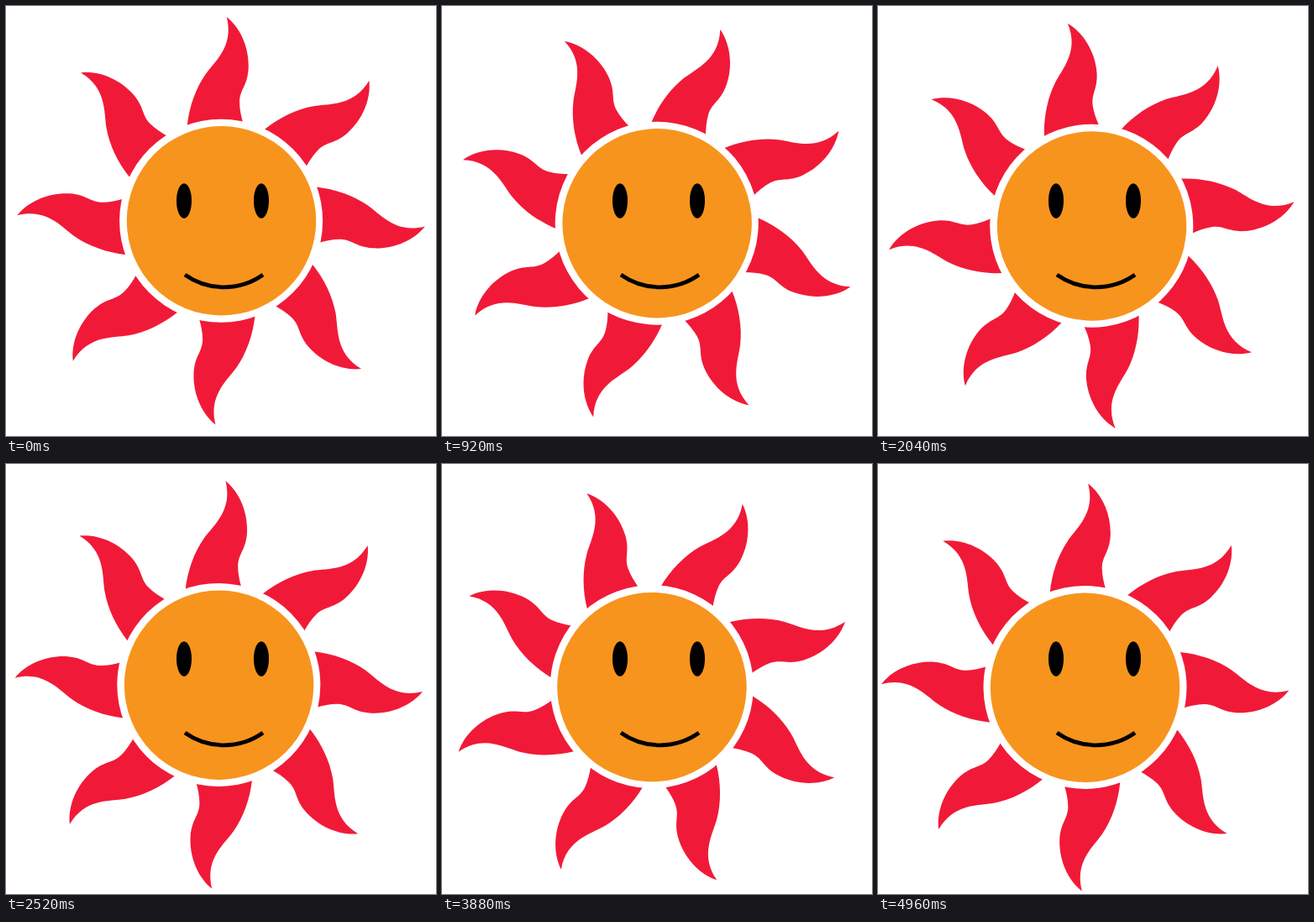
Write an HTML page that moves like this. It is 512 px wide and 512 px high and loops after 5000 ms.

```html
<!DOCTYPE html>
<html lang="en">
<head>
<meta charset="utf-8">
<title>Smiling sun</title>
<style>
  html, body { margin: 0; width: 100%; height: 100%; overflow: hidden; background: #fff; }
  svg { display: block; width: 100%; height: 100%; }
</style>
</head>
<body>
<svg viewBox="0 0 512 512">
  <g id="sun">
    <g transform="translate(256.1 255.8)">
      <g id="rays" fill="#f01a38"></g>
      <circle r="121" fill="#fff"/>
      <circle cx=".4" r="112.7" fill="#f7941d"/>
    </g>
  </g>
  <ellipse cx="212" cy="232" rx="9" ry="20.7"/>
  <ellipse cx="304" cy="232" rx="9" ry="20.7"/>
  <path d="M213 320A80.5 80.5 0 0 0 306 320" fill="none" stroke="#000" stroke-width="4.8"/>
</svg>
<script>
  const LOOP = 5000, STEP = 40, TURN = 90;
  const RAY = 'M6.6-242.7C24-229 34-204 32.5-180C31-160 22-156 22-141C22-133 24-124 26-117' +
    'L-40.4-113C-38-136-30-158-18.5-174.5C-7-190.5 15.5-208 6.6-242.7Z';
  const sun = document.getElementById('sun');

  document.getElementById('rays').innerHTML = Array.from({ length: 8 }, (_, i) =>
    `<path d="${RAY}" transform="rotate(${i * 45})"/>`).join('');

  // The pivot sits left of the disc, so the sun drifts as it turns.
  const start = performance.now();
  function draw(now) {
    const elapsed = Math.max(0, now - start) % LOOP;
    const time = Math.floor(elapsed / STEP) * STEP;
    sun.setAttribute('transform', `rotate(${TURN * time / LOOP} 246.2 256)`);
    requestAnimationFrame(draw);
  }
  draw(start);
</script>
</body>
</html>
```
